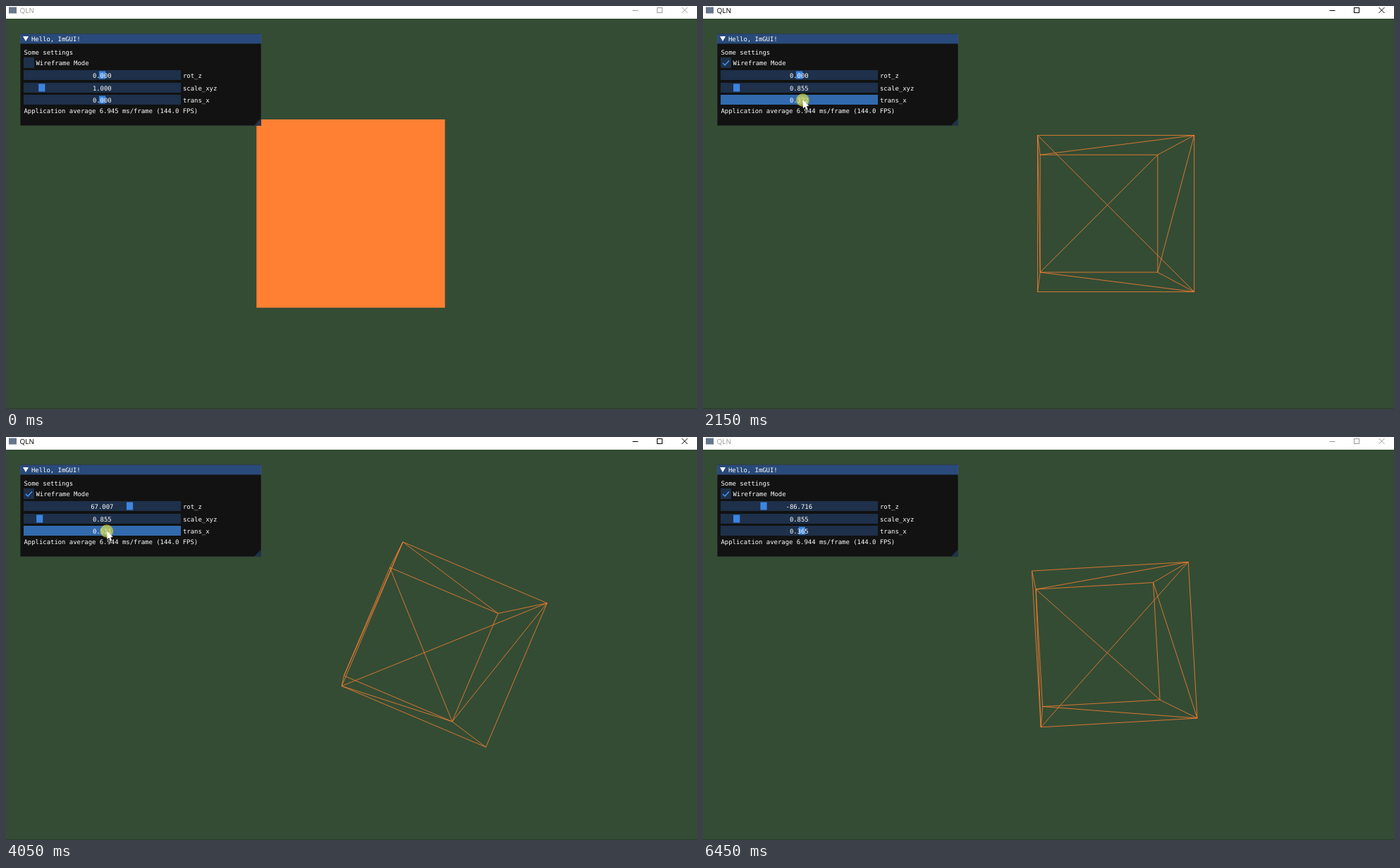
An HTML page with a canvas that plays this animation: 980 px wide and 572 px high, repeating every 6500 ms.

```html
<!DOCTYPE html>
<html>
<head>
<meta charset="utf-8">
<style>
html, body { margin: 0; width: 980px; height: 572px; overflow: hidden; background: #344c34; }
canvas { display: block; }
</style>
</head>
<body>
<canvas id="stage" width="980" height="572"></canvas>
<script>
const ctx = document.getElementById('stage').getContext('2d');
const LOOP = 6500, STEP = 50, WIRE_ON = 1700;
const FOCAL = 668.3, EYE = 3, CX = 488.9, CY = 294.6;
const ORANGE = '#ff8033', BLUE = '#4296fa';

const rot = { name: 'rot_z', y: 91, min: -180, max: 180 };
const scale = { name: 'scale_xyz', y: 109, min: .1, max: 10 };
const trans = { name: 'trans_x', y: 126, min: -10, max: 10 };
const sliders = [rot, scale, trans];

// A drag sweeps a slider through evenly timed turning values; a stop rests the mouse at a point.
const drag = (slider, start, end, ...values) => ({ slider, start, end, values });
const stop = (start, end, ...point) => ({ start, end, point });
const gestures = [
  stop(50, 50, 905, 528),
  stop(400, 400, 526, 256),
  stop(650, 700, 54, 116),
  drag(scale, 780, 1380, 1, 1.179, .855),
  stop(1500, 1750, 34, 82),
  drag(trans, 2065, 2750, 0, 1.5, -1.46),
  drag(rot, 3150, 3550, 0, 67.007),
  drag(trans, 3793, 4849, -1.46, 1.24, -.87, 1.41),
  drag(trans, 4849, 4945, 1.41, .365),
  drag(rot, 5150, 5800, 67.007, -86.716),
  stop(5950, 5950, 130, 46),
  stop(6250, 6300, 960, 552)
];

const clamp = u => Math.max(0, Math.min(1, u));
const mix = (a, b, u) => a + (b - a) * u;

function sweep({ start, end, values }, t) {
  const u = clamp((t - start) / (end - start)) * (values.length - 1);
  const i = Math.min(Math.floor(u), values.length - 2);
  return mix(values[i], values[i + 1], u - i);
}

function valueOf(slider, t) {
  const drags = gestures.filter(g => g.slider === slider);
  return sweep(drags.filter(g => g.start <= t).pop() || drags[0], t);
}

function isHeld(slider, t) {
  return gestures.some(g => g.slider === slider && t >= g.start - 50 && t < g.end + 100);
}

function grabX(slider, value) {
  return 31.7 + 209.6 * (value - slider.min) / (slider.max - slider.min);
}

function mouseAt(t) {
  const place = g => g.point || [grabX(g.slider, sweep(g, t)) + 1.5, g.slider.y + 7.5];
  const next = gestures.findIndex(g => g.end >= t);
  if (next <= 0) return place(gestures[next < 0 ? gestures.length - 1 : 0]);
  const a = gestures[next - 1], b = gestures[next];
  const u = t >= b.start ? 1 : (t - a.end) / (b.start - a.end);
  const p = place(a), q = place(b);
  return [mix(p[0], q[0], u), mix(p[1], q[1], u)];
}

function rect(x, y, w, h, color) {
  ctx.fillStyle = color;
  ctx.fillRect(x, y, w, h);
}

function path(points, close) {
  ctx.beginPath();
  points.forEach(p => ctx.lineTo(p[0], p[1]));
  if (close) ctx.closePath();
}

function shape(points, color) {
  path(points, true);
  ctx.fillStyle = color;
  ctx.fill();
}

function line(points, color, width = 1) {
  path(points);
  ctx.strokeStyle = color;
  ctx.lineWidth = width;
  ctx.stroke();
}

function label(text, x, y, align = 'left') {
  ctx.font = '8.92px "DejaVu Sans Mono", monospace';
  ctx.textAlign = align;
  ctx.fillStyle = '#fff';
  ctx.fillText(text, x, y);
}

function drawCube(t) {
  const a = valueOf(rot, t) * Math.PI / 180, h = valueOf(scale, t) / 2, tx = valueOf(trans, t);
  // Corners run clockwise from the top left; z is 1 in front, -1 behind.
  const face = z => [0, 1, 2, 3].map(i => {
    const k = FOCAL / (EYE - z * h), r = h * Math.SQRT2, angle = a + Math.PI * (.75 - i / 2);
    return [CX + k * (tx + r * Math.cos(angle)), CY - k * r * Math.sin(angle)];
  });
  const front = face(1), back = face(-1);
  if (t < WIRE_ON) return shape(front, ORANGE);
  const wire = (p, q) => line([p, q], ORANGE, .8);
  for (let i = 0; i < 4; i++) {
    const n = (i + 1) % 4;
    wire(front[i], front[n]);
    wire(back[i], back[n]);
    wire(front[i], back[i]);
    // Side diagonals lean alternately one way and the other.
    if (i < 2) wire(front[1], back[2 * i]);
    else wire(front[i === 2 ? 2 : 0], back[3]);
  }
  wire(front[0], front[2]);
  wire(back[1], back[3]);
}

function drawTitleBar(active) {
  const ink = active ? '#000' : '#999';
  rect(0, 0, 980, 18, '#fff');
  rect(4, 1.5, 11, 9, '#66768c');
  ctx.font = '10px "Open Sans", sans-serif';
  ctx.textAlign = 'left';
  ctx.fillStyle = ink;
  ctx.fillText('QLN', 19.5, 10);
  line([[888.5, 6.5], [896.5, 6.5]], ink);
  ctx.strokeRect(923.5, 2.5, 7, 7);
  line([[958.5, 2], [966.5, 10]], ink);
  line([[966.5, 2], [958.5, 10]], ink);
}

function drawField(x, y, w, h, mouse, held) {
  const hover = mouse[0] >= x && mouse[0] <= x + w && mouse[1] >= y && mouse[1] <= y + h;
  rect(x, y, w, h, held ? 'rgba(66,150,250,.67)' : hover ? 'rgba(66,150,250,.4)' : 'rgba(41,74,122,.54)');
}

function drawPanel(t, mouse) {
  rect(20, 39, 342, 131, 'rgba(15,15,15,.94)');
  rect(20, 39.5, 342, 14, '#294a7a');
  ctx.strokeStyle = 'rgba(110,110,128,.2)';
  ctx.lineWidth = 1;
  ctx.strokeRect(20.5, 39.5, 341, 130);
  shape([[24, 43], [32, 43], [28, 50]], '#fff');
  shape([[361.5, 160], [361.5, 169.5], [352, 169.5]], 'rgba(66,150,250,.25)');
  label('Hello, ImGUI!', 36, 50);
  label('Some settings', 25.5, 68.5);

  drawField(25, 73, 15, 15, mouse);
  if (t >= WIRE_ON) line([[28, 81], [31, 84], [37, 77.5]], BLUE, 1.5);
  label('Wireframe Mode', 42.5, 84);

  for (const s of sliders) {
    const value = valueOf(s, t), held = isHeld(s, t);
    drawField(25, s.y, 223, 14, mouse, held);
    rect(grabX(s, value) - 4.6, s.y + 1.5, 9.2, 11, held ? '#3b7ed2' : '#3d85e0');
    label(value.toFixed(3), 136.3, s.y + 10.6, 'center');
    label(s.name, 251, s.y + 10.6);
  }
  const ms = t < 1400 ? 6.945 : t < 2100 ? 6.940 : 6.944;
  label(`Application average ${ms.toFixed(3)} ms/frame (${(1000 / ms).toFixed(1)} FPS)`, 25.5, 152.3);
}

function arrow(x, y, color, k = 1) {
  const points = [[0, 0], [0, 12], [2.7, 9.6], [4.8, 14], [6.8, 13], [4.9, 8.8], [8.4, 8.6]];
  shape(points.map(p => [x + p[0] * k, y + p[1] * k]), color);
}

function drawMouse(t, [x, y]) {
  if (t < 2600 || t >= 2900) {
    ctx.beginPath();
    ctx.arc(x - .5, y, 9.3, 0, 7);
    ctx.fillStyle = 'rgba(222,218,62,.66)';
    ctx.fill();
  }
  arrow(x, y, '#fff');
}

function frame(now) {
  const t = Math.floor(now % LOOP / STEP) * STEP;
  const mouse = mouseAt(t);
  ctx.textRendering = 'geometricPrecision';
  rect(0, 0, 980, 572, '#344c34');
  drawCube(t);
  rect(0, 571, 980, 1, '#2b3d2d');
  drawTitleBar(t >= 750 && t < 6350);
  drawPanel(t, mouse);
  if (t >= 400 && t < WIRE_ON) arrow(526, 256.5, '#83827c', 1.15);
  if (t >= 50 && t < 6300) drawMouse(t, mouse);
  requestAnimationFrame(frame);
}
requestAnimationFrame(frame);
</script>
</body>
</html>
```
